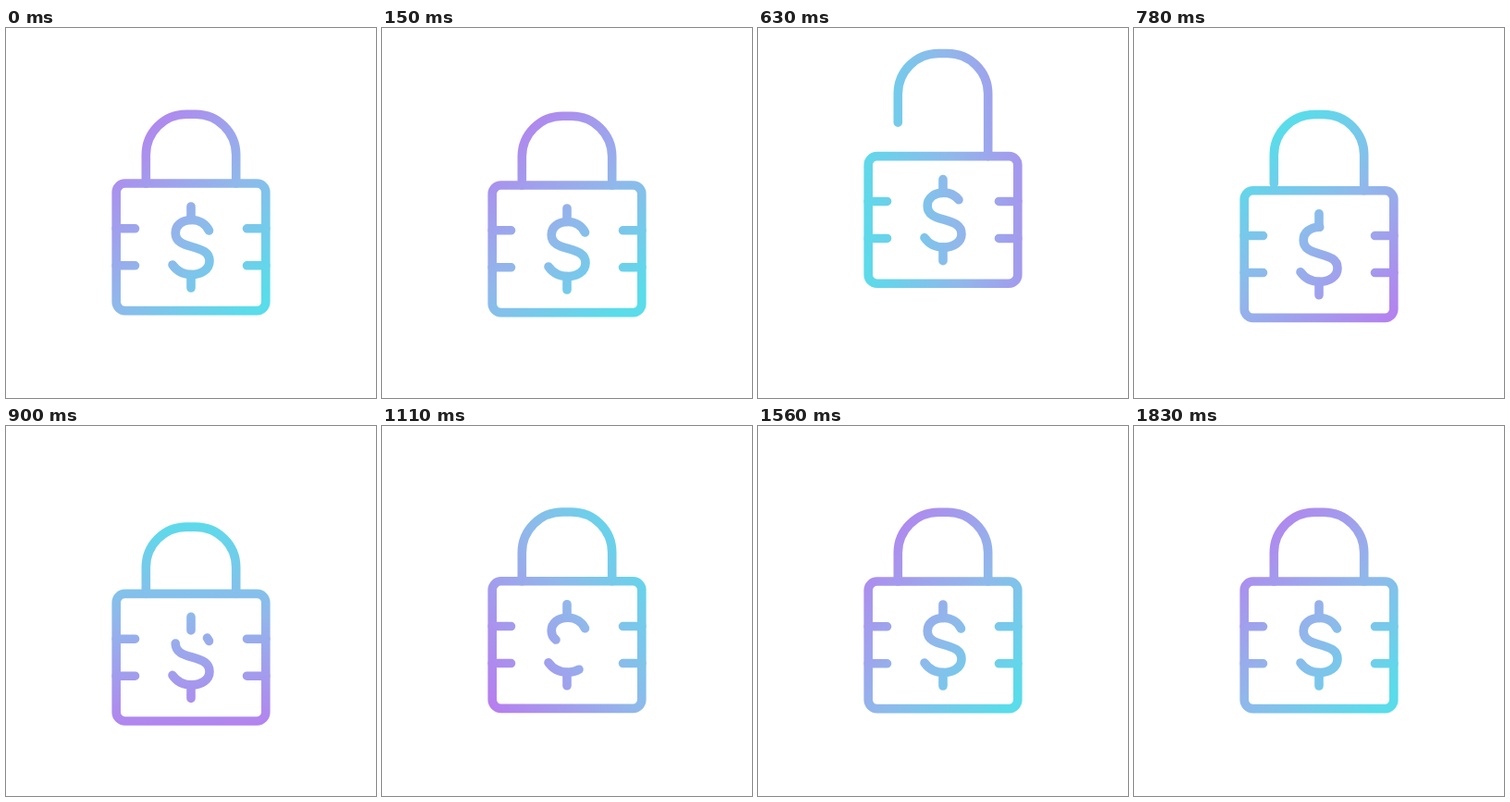
Write an HTML page that moves like this. It is 400 px wide and 400 px high and loops after 3860 ms.

```html
<!DOCTYPE html>
<html lang="en">
<head>
<meta charset="utf-8">
<title>Lock</title>
<style>
  html, body { margin: 0; width: 100%; height: 100%; overflow: hidden; background: #fff; }
  svg { display: block; width: 100%; height: 100%; }
</style>
</head>
<body>
<svg viewBox="0 0 400 400">
  <defs>
    <linearGradient id="ink" gradientUnits="userSpaceOnUse" x1="-180" y1="0" x2="105" y2="0">
      <stop offset="0" stop-color="#c46af0"/>
      <stop offset="0.63" stop-color="#90b8eb"/>
      <stop offset="1" stop-color="#5adcea"/>
    </linearGradient>
    <path id="curve" pathLength="1" d="M219.5 219C216 212 209 207.5 201 207.5C190 207.5 183.2 213.5 183.2 221.5
      C183.2 231.5 192 234 201 236.5C212 239.5 220 242.5 220 252C220 261 211 266.5 201 266.5C192 266.5 184.5 262.5 180 256"/>
  </defs>
  <g id="lock" fill="none" stroke="url(#ink)" stroke-width="9.6" stroke-linecap="round">
    <path id="shackle"/>
    <rect x="119.2" y="168" width="161.6" height="137.6" rx="9.5"/>
    <path d="M119.2 216.8H139.5M119.2 256.8H139.5M260.5 216.8H280.8M260.5 256.8H280.8"/>
    <path d="M200 193V207.5M200 266.5V281"/>
    <use href="#curve" id="oldCurve"/>
    <use href="#curve" id="newCurve"/>
  </g>
</svg>
<script>
const LOOP = 3860, STEP = 30, END = 1830;

const $ = id => document.getElementById(id);
const progress = (t, start, end) => Math.min(1, Math.max(0, (t - start) / (end - start)));
const smooth = u => u * u * (3 - 2 * u);
const cubic = u => u < 0.5 ? 4 * u ** 3 : 1 - 4 * (1 - u) ** 3;
const move = (t, start, end, distance) => distance * cubic(progress(t, start, end));

// Crouch, jump, land, rebound, settle.
const bodyShift = t => move(t, 90, 270, 13.4) + move(t, 240, 450, -48.4) + move(t, 510, 900, 48.4)
  + move(t, 900, 1230, -16.9) + move(t, 1230, 1410, 3.5);

// Pop open, snap shut slightly too far, settle.
const shackleShift = t => move(t, 240, 390, -36.5) + move(t, 630, 880, 38.9) + move(t, 910, 1050, -2.4);

const gradientAngle = t => 45 + 360 * smooth(1 - (1 - progress(t, 60, END)) ** 1.35);

function trim(el, from, to) {
  el.style.visibility = to > from ? "visible" : "hidden";
  el.style.strokeDasharray = `${to - from} 9`;
  el.style.strokeDashoffset = -from;
}

function draw(t) {
  const shift = bodyShift(t), open = shackleShift(t);

  $("lock").setAttribute("transform", `translate(0 ${shift})`);
  // The gradient turns about a fixed point of the stage.
  $("ink").setAttribute("gradientTransform", `translate(213 ${204 - shift}) rotate(${gradientAngle(t)})`);
  $("shackle").setAttribute("d",
    `M151.3 ${Math.min(168, 168 + open)}V${137 + open}a43.7 43.7 0 0 1 43.7 -43.7h10a43.7 43.7 0 0 1 43.7 43.7V168`);

  trim($("oldCurve"), progress(t, 510, 1200) ** 2, 1);
  trim($("newCurve"), 0, smooth(progress(t, 840, 1470)));
}

function frame() {
  const t = performance.now() % LOOP;
  draw(Math.min(END, Math.floor(t / STEP) * STEP));
  requestAnimationFrame(frame);
}
frame();
</script>
</body>
</html>
```
